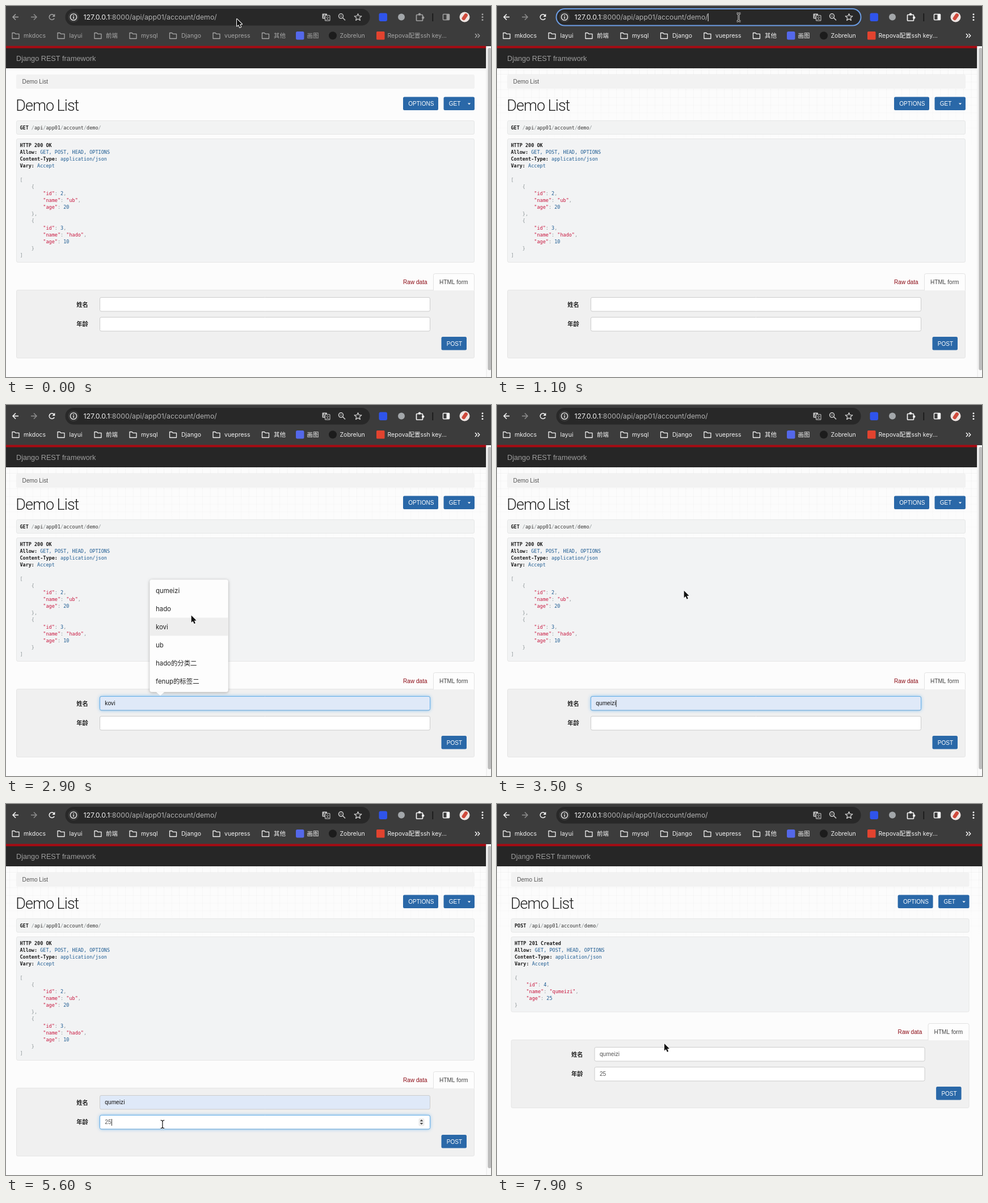
Recreate the animation shown at these times as an HTML page with a canvas. Size 855 px wide and 655 px high, loop 8000 ms.

```html
<!DOCTYPE html>
<html lang="zh">
<head>
<meta charset="utf-8">
<title>Demo List</title>
<style>
html, body { margin: 0; width: 100%; height: 100%; overflow: hidden; background: #fcfcfc; }
canvas { display: block; width: 855px; height: 655px; }
</style>
</head>
<body>
<canvas id="stage"></canvas>
<script>
const W = 855, H = 655, LOOP = 8000;
const canvas = document.getElementById('stage');
const c = canvas.getContext('2d');
const dpr = window.devicePixelRatio || 1;
canvas.width = W * dpr;
canvas.height = H * dpr;

const SANS = '"Liberation Sans", "Noto Sans CJK SC", "Noto Sans CJK", sans-serif';
const UI = 'Inter, "Noto Sans CJK SC", "Noto Sans CJK", sans-serif';
const MONO = '"DejaVu Sans Mono", monospace';
const BLUE = '#2a68a8', LIT = '#1d5b92', STR = '#c8143c', PUN = '#8f9799';

const NAMES = ['qumeizi', 'hado', 'kovi', 'ub', 'hado的分类二', 'fenup的标签二'];
const ROWS = [{ id: 2, name: 'ub', age: 20 }, { id: 3, name: 'hado', age: 10 }];
const CREATED = { id: 4, name: 'qumeizi', age: 25 };

// Moments of the interaction, in ms
const T = {
  active: 550, urlFocus: 800, reload: 1300, reloaded: 1600,
  nameFocus: 2350, nameList: 2450, pick: 3450,
  ageFocus: 4220, key1: 4900, key2: 5200, submit: 6650, created: 6900
};

// Pointer stops: time, x, y
const PATH = [
  [0, 407, 23], [300, 407, 23], [800, 426, 20], [1350, 426, 20],
  [1950, 273, 562], [2080, 273, 562], [2330, 300, 527], [2500, 300, 527],
  [3100, 336, 317], [3480, 330, 327], [4050, 230, 562], [5450, 230, 562],
  [6300, 787, 604], [6900, 787, 604], [7200, 750, 468], [7800, 295, 423], [8000, 295, 423]
];

const clamp = v => Math.max(0, Math.min(1, v));
const smooth = k => k * k * (3 - 2 * k);
const ramp = (t, from, len = 150) => clamp((t - from) / len);
const within = (p, x, y, w, h) => p.x >= x && p.x <= x + w && p.y >= y && p.y <= y + h;

function pointerAt(t) {
  let i = 1;
  while (i < PATH.length - 1 && t > PATH[i][0]) i++;
  const a = PATH[i - 1], b = PATH[i];
  const k = smooth(clamp((t - a[0]) / (b[0] - a[0])));
  return { x: a[1] + (b[1] - a[1]) * k, y: a[2] + (b[2] - a[2]) * k };
}

function rect(x, y, w, h, fill) {
  c.fillStyle = fill;
  c.fillRect(x, y, w, h);
}

function box(x, y, w, h, r, fill, stroke, lw = 1) {
  c.beginPath();
  c.roundRect(x, y, w, h, r);
  if (fill) { c.fillStyle = fill; c.fill(); }
  if (stroke) { c.strokeStyle = stroke; c.lineWidth = lw; c.stroke(); }
}

function disc(x, y, r, fill) {
  c.beginPath();
  c.arc(x, y, r, 0, 7);
  c.fillStyle = fill;
  c.fill();
}

function line(color, lw, ...pts) {
  c.beginPath();
  pts.forEach(([x, y]) => c.lineTo(x, y));
  c.strokeStyle = color;
  c.lineWidth = lw;
  c.stroke();
}

function poly(fill, ...pts) {
  c.beginPath();
  pts.forEach(([x, y]) => c.lineTo(x, y));
  c.closePath();
  c.fillStyle = fill;
  c.fill();
}

// y is the middle of the capitals; returns the x after the text
function text(s, x, y, size, color, family = SANS, weight = 400) {
  c.font = `${weight} ${size}px ${family}`;
  c.fillStyle = color;
  c.fillText(s, x, y + size * 0.36);
  return x + c.measureText(s).width;
}

const code = (s, x, y, color, weight) => text(s, x, y, 8.5, color, MONO, weight);

/* ---------- browser bar ---------- */

function folder(x, color) {
  c.beginPath();
  c.moveTo(x + 1, 47.5);
  c.lineTo(x + 5, 47.5);
  c.lineTo(x + 6.8, 49.3);
  c.lineTo(x + 13, 49.3);
  c.lineTo(x + 13, 57.5);
  c.lineTo(x + 1, 57.5);
  c.closePath();
  c.strokeStyle = color;
  c.lineWidth = 1.3;
  c.stroke();
}

function arrowIcon(x, dir, color) {
  line(color, 1.7, [x - 5 * dir, 19.5], [x + 5 * dir, 19.5]);
  line(color, 1.7, [x, 14.5], [x + 5 * dir, 19.5], [x, 24.5]);
}

function reloadIcon(color, loading) {
  if (loading) {
    line(color, 1.7, [77, 15.5], [85, 23.5]);
    line(color, 1.7, [85, 15.5], [77, 23.5]);
    return;
  }
  c.beginPath();
  c.arc(81, 19.5, 4.7, 0.5, 5.6);
  c.strokeStyle = color;
  c.lineWidth = 1.6;
  c.stroke();
  poly(color, [86.3, 13.8], [86.3, 18.9], [81.4, 18.9]);
}

function starIcon(x, y, color) {
  const pts = [];
  for (let i = 0; i < 11; i++) {
    const a = -Math.PI / 2 + i * Math.PI / 5, r = i % 2 ? 2.9 : 6.6;
    pts.push([x + r * Math.cos(a), y + r * Math.sin(a)]);
  }
  line(color, 1.3, ...pts);
}

function omnibox(t, icon) {
  box(104.5, 5, 537, 29.5, 14.7, '#282828');
  const focused = t >= T.urlFocus && t < T.reload;
  if (focused) box(104.5, 5, 537, 29.5, 14.7, null, '#6c9de4', 2);

  disc(119, 19.5, 9.5, '#3a3a3a');
  c.beginPath();
  c.arc(119, 19.5, 5.6, 0, 7);
  c.strokeStyle = '#e6e6e6';
  c.lineWidth = 1.4;
  c.stroke();
  rect(118.3, 18.7, 1.5, 4, '#e6e6e6');
  rect(118.3, 16.2, 1.5, 1.5, '#e6e6e6');

  let x = text('127.0.0.1', 136.5, 19.7, 12.3, '#f2f2f2', UI);
  x = text(':8000/api/app01/account/demo/', x, 19.7, 12.3, '#b2b2b2', UI);
  if (focused && (t - T.urlFocus) % 1000 < 500) rect(x, 13, 1, 14, '#f0f0f0');

  box(557.5, 13.5, 8.5, 9, 1, '#c4c4c4');
  text('A', 559, 18, 7, '#333', UI, 700);
  box(562.5, 16.5, 8.5, 9.5, 1, '#282828', '#c4c4c4', 1.1);
  text('文', 563.4, 21.4, 6.6, '#d0d0d0', UI);

  c.beginPath();
  c.arc(590.5, 17.8, 4, 0, 7);
  c.strokeStyle = icon;
  c.lineWidth = 1.5;
  c.stroke();
  line(icon, 1.6, [593.5, 20.8], [598, 25.3]);
  line(icon, 1, [588.7, 17.8], [592.3, 17.8]);
  starIcon(620.5, 20, icon);
}

function browser(t) {
  const on = t >= T.active;
  const icon = on ? '#f4f4f4' : '#a0a0a0';
  const label = on ? '#f2f2f2' : '#a6a6a6';
  const loading = (t >= T.reload && t < T.reloaded) || (t >= T.submit && t < T.created);
  rect(0, 0, W, 71, '#3c3c3c');
  arrowIcon(17, -1, icon);
  arrowIcon(49, 1, '#8b8b8b');
  reloadIcon(icon, loading);
  omnibox(t, on ? '#d0d0d0' : '#c0c0c0');

  box(657.5, 12.5, 14.5, 14.5, 3, '#2f54eb');
  disc(697, 19.5, 6, '#a3a7aa');
  c.beginPath();
  c.roundRect(723.5, 15.5, 11, 10.5, 1);
  c.strokeStyle = icon;
  c.lineWidth = 1.7;
  c.stroke();
  disc(729, 14.6, 2.2, icon);
  disc(735.2, 20.5, 2.2, icon);
  rect(751.5, 13, 1.6, 14, '#161616');
  box(770.5, 14.5, 11, 10, 1, null, icon, 1.5);
  rect(776.5, 14.5, 5, 10, icon);
  disc(808.5, 19.5, 9, '#efe6e3');
  c.save();
  c.translate(808.5, 19.5);
  c.rotate(0.6);
  box(-3.2, -7, 6.4, 13, 3, '#cf4a3c');
  c.restore();
  [14.8, 19.6, 24.4].forEach(y => disc(840, y, 1.5, icon));

  [['mkdocs', 10, 31], ['layui', 90, 111.5], ['前端', 155, 176], ['mysql', 217, 238],
   ['Django', 287.5, 309], ['vuepress', 364, 385], ['其他', 450.5, 472]].forEach(([s, fx, tx]) => {
    folder(fx, label);
    text(s, tx, 52.3, 10.5, label, UI);
  });
  box(511, 45, 14.5, 14.5, 2.5, '#5468ea');
  text('画图', 530.5, 52.3, 10.5, label, UI);
  disc(576, 52.3, 7, '#1c1c1c');
  text('Zobrelun', 588.5, 52.3, 10.5, label, UI);
  box(653, 45, 14.5, 14.5, 1.5, '#e2432f');
  text('Repova配置ssh key...', 672.5, 52.3, 10.5, label, UI);
  [827, 831.5].forEach(x => line(icon, 1.5, [x, 49], [x + 3.3, 52.5], [x, 56]));
}

/* ---------- page ---------- */

function grid(width) {
  for (let x = 6; x < width; x += 13.6) {
    const g = c.createLinearGradient(0, 110, 0, 260);
    g.addColorStop(0, 'rgba(0,0,0,.035)');
    g.addColorStop(1, 'rgba(0,0,0,0)');
    rect(x, 110, 1, 150, g);
  }
  for (let y = 120; y < 260; y += 13.6) {
    rect(0, y, width, 1, `rgba(0,0,0,${0.035 * (1 - (y - 110) / 150)})`);
  }
}

function button(label, x, y, w, fill = BLUE) {
  box(x, y, w, 23.5, 2.5, fill);
  return text(label, x + 9.3, y + 12, 10, '#fff');
}

function jsonLine(s, x, y) {
  (s.match(/"[^"]*"|\d+|[^"\d]+/g) || []).forEach(tok => {
    const color = tok[0] === '"' ? STR : /\d/.test(tok[0]) ? LIT : PUN;
    x = code(tok, x, y, color);
  });
}

function response(posted) {
  box(18.5, 202.5, 807, 24, 2.5, '#f2f3f3', '#e6e7e7');
  let x = code(posted ? 'POST ' : 'GET ', 24.4, 214.6, '#1c1c1c', 700);
  '/api/app01/account/demo/'.match(/\w+|\//g).forEach(tok => {
    x = code(tok, x, 214.6, tok === '/' ? PUN : '#333');
  });

  const row = i => 246 + i * 12.13;
  box(18.5, 234.5, 807, posted ? 132.5 : 218, 2.5, '#f2f3f4', '#e6e7e7');
  code(posted ? 'HTTP 201 Created' : 'HTTP 200 OK', 24.4, row(0), '#1c1c1c', 700);
  [['Allow: ', 'GET, POST, HEAD, OPTIONS'], ['Content-Type: ', 'application/json'], ['Vary: ', 'Accept']]
    .forEach(([k, v], i) => {
      const end = code(k, 24.4, row(i + 1), '#1c1c1c', 700);
      code(v, end, row(i + 1), LIT);
    });
  JSON.stringify(posted ? CREATED : ROWS, null, 4).split('\n')
    .forEach((s, i) => jsonLine(s, 24.4, row(i + 5)));
}

function input(y, value, o) {
  const glow = o.glow || 0;
  if (glow > 0) {
    c.save();
    c.shadowColor = `rgba(80,165,235,${0.75 * glow})`;
    c.shadowBlur = 6;
    box(165.5, y, 582, 24.5, 2.5, '#fff');
    c.restore();
  }
  box(165.5, y, 582, 24.5, 2.5, o.auto ? '#dfe9f8' : '#fff', '#ccc');
  if (glow > 0) box(165.5, y, 582, 24.5, 2.5, null, `rgba(102,175,233,${glow})`);
  const end = text(value, 174.3, y + 12.3, 10.2, o.auto ? '#111' : '#555');
  if (o.caret) rect(end + 0.3, y + 6.5, 1, 12, '#333');
  if (o.spin) {
    box(727.5, y + 5.5, 10, 13.5, 2, '#ececec');
    poly('#444', [729.7, y + 10.7], [735.3, y + 10.7], [732.5, y + 7.6]);
    poly('#444', [729.7, y + 13.5], [735.3, y + 13.5], [732.5, y + 16.6]);
  }
}

function form(t, p, posted, hover) {
  const dy = posted ? -85 : 0;
  c.save();
  c.translate(0, dy);
  text('Raw data', 700, 487, 10.1, '#8c0a14');
  box(18.5, 501.5, 807, 120, 2.5, '#f0f0f0', '#e5e5e5');
  box(753.5, 472.5, 72, 29.5, [3, 3, 0, 0], '#fdfdfd', '#e2e2e2');
  rect(754, 500.5, 71, 2, '#fdfdfd');
  text('HTML form', 764, 487, 10.1, '#444');
  text('姓名', 124.3, 527, 10.3, '#222', SANS, 700);
  text('年龄', 124.3, 561.5, 10.3, '#222', SANS, 700);

  const picked = t >= T.pick;
  const name = picked ? NAMES[0] : hover >= 0 ? NAMES[hover] : '';
  const age = t >= T.key2 ? '25' : t >= T.key1 ? '2' : '';
  const since = t - (t >= T.key2 ? T.key2 : t >= T.key1 ? T.key1 : T.ageFocus);
  input(514.5, name, {
    auto: !posted && name !== '',
    glow: posted ? 0 : ramp(t, T.nameFocus) - ramp(t, T.ageFocus),
    caret: t >= T.nameFocus && t < T.ageFocus && hover < 0 && (t - T.nameFocus) % 1000 < 500
  });
  input(549.5, age, {
    glow: posted ? 0 : ramp(t, T.ageFocus) - ramp(t, T.submit),
    caret: t >= T.ageFocus && t < T.submit && since % 1000 < 500,
    spin: within(p, 165, 549 + dy, 582, 25)
  });

  const overPost = !posted && within(p, 767, 584, 45, 24);
  const pressed = !posted && t >= T.submit;
  if (pressed) box(766.8, 583.3, 45.6, 25, 3.5, '#fff', '#8ebbe6', 1.2);
  button('POST', 767.5, 584, 44.5, pressed ? '#1f4d80' : overPost ? '#235a92' : BLUE);
  c.restore();
}

function page(t, p, hover) {
  const posted = t >= T.created;
  const width = posted ? W : 846.5;
  rect(0, 71, W, H - 71, '#fcfcfc');
  if (t >= T.active) grid(width);
  rect(0, 71, width, 39, '#262626');
  rect(0, 70.5, width, 4, '#a80a12');
  if (!posted) {
    rect(846.5, 71, 8.5, H - 71, '#fafafa');
    rect(846.5, 71, 1, H - 71, '#e8e8e8');
    box(849.3, 74, 6.2, 569, 3, '#bdbdbd');
  }

  c.save();
  c.translate(posted ? 6.6 : 0, 0);
  text('Django REST framework', 18, 92.3, 12.7, '#9d9d9d');
  box(18, 121, 808, 25, 2.5, '#f2f2f2');
  text('Demo List', 28.6, 133.5, 10.1, '#555');
  c.letterSpacing = '-1px';
  text('Demo List', 17.3, 175, 27, '#222', 'Roboto, sans-serif', 300);
  c.letterSpacing = '0px';
  button('OPTIONS', 700, 160.5, 62);
  button('GET', 771.5, 160.5, 54.5);
  poly('#fff', [813.8, 171.5], [819.2, 171.5], [816.5, 174.3]);
  response(posted);
  form(t, p, posted, hover);
  c.restore();
}

/* ---------- suggestion lists and pointer ---------- */

function bubble(y, h, tip, dir) {
  c.save();
  c.shadowColor = 'rgba(0,0,0,.3)';
  c.shadowBlur = 5;
  c.shadowOffsetY = 1;
  box(253.3, y, 138.5, h, 4, '#fdfdfd');
  c.restore();
  poly('#fdfdfd', [264.5, tip - 6.5 * dir], [279.5, tip - 6.5 * dir], [272, tip]);
}

function suggestions(t, hover) {
  if (t >= T.nameList && t < T.pick) {
    bubble(308.3, 198.5, 513, 1);
    if (hover >= 0) rect(253.3, 311.7 + hover * 31.9, 138.5, 31.9, '#eeeeee');
    NAMES.forEach((s, i) => text(s, 264, 328 + i * 31.9, 11.4, '#222', UI));
  }
  if (t >= T.ageFocus + 30 && t < T.key1) {
    bubble(581.7, 39.3, 575, -1);
    text('18', 264, 602, 11.4, '#222', UI);
  }
}

function arrow() {
  const pts = [[0, 0], [0, 12.6], [2.9, 10], [5, 14.8], [7.2, 13.8], [5.1, 9.2], [9, 9]];
  line('#fff', 2, ...pts, pts[0], pts[1]);
  poly('#111', ...pts);
}

function beam() {
  [['#fff', 2.8], ['#222', 1.3]].forEach(([color, lw]) => {
    line(color, lw, [0, -5.5], [0, 5.5]);
    line(color, lw, [-3.3, -7], [-1.2, -6.8], [0, -5.5], [1.2, -6.8], [3.3, -7]);
    line(color, lw, [-3.3, 7], [-1.2, 6.8], [0, 5.5], [1.2, 6.8], [3.3, 7]);
  });
}

function hand() {
  c.beginPath();
  c.moveTo(-1.6, 0.6);
  c.quadraticCurveTo(0, -1.4, 1.2, 0.8);
  c.lineTo(2.3, 4.4);
  c.lineTo(7.4, 5);
  c.quadraticCurveTo(9.2, 6, 8.8, 9);
  c.lineTo(7.6, 14);
  c.lineTo(1.2, 14);
  c.lineTo(-3.8, 8.8);
  c.quadraticCurveTo(-3.6, 6.6, -0.2, 8.4);
  c.closePath();
  c.fillStyle = '#fff';
  c.fill();
  c.strokeStyle = '#111';
  c.lineWidth = 1.2;
  c.stroke();
  [3, 5.2].forEach(x => line('#111', 0.9, [x, 5.6], [x + 0.4, 8.2]));
}

function pointer(t, p) {
  const dx = t >= T.created ? 6.6 : 0, dy = t >= T.created ? -85 : 0;
  const inUrl = t >= T.active && within(p, 136, 5, 415, 29);
  const inField = [514.5, 549.5].some(y => within(p, 165 + dx, y + dy, 582, 24.5));
  const onPost = within(p, 767 + dx, 584 + dy, 45, 24);
  c.save();
  c.translate(p.x, p.y);
  (inUrl || inField ? beam : onPost ? hand : arrow)();
  c.restore();
}

function hoveredRow(t) {
  if (t < T.nameList || t >= T.pick) return -1;
  const row = Math.floor((pointerAt(t - 40).y - 311.7) / 31.9);
  return row >= 0 && row < NAMES.length ? row : -1;
}

function draw(t) {
  c.setTransform(dpr, 0, 0, dpr, 0, 0);
  c.lineJoin = 'round';
  const p = pointerAt(t), hover = hoveredRow(t);
  browser(t);
  page(t, p, hover);
  suggestions(t, hover);
  pointer(t, p);
}

const start = performance.now();
function tick() {
  // The screen updates ten times a second
  draw(Math.floor((performance.now() - start) % LOOP / 100) * 100);
  requestAnimationFrame(tick);
}
tick();
</script>
</body>
</html>
```
